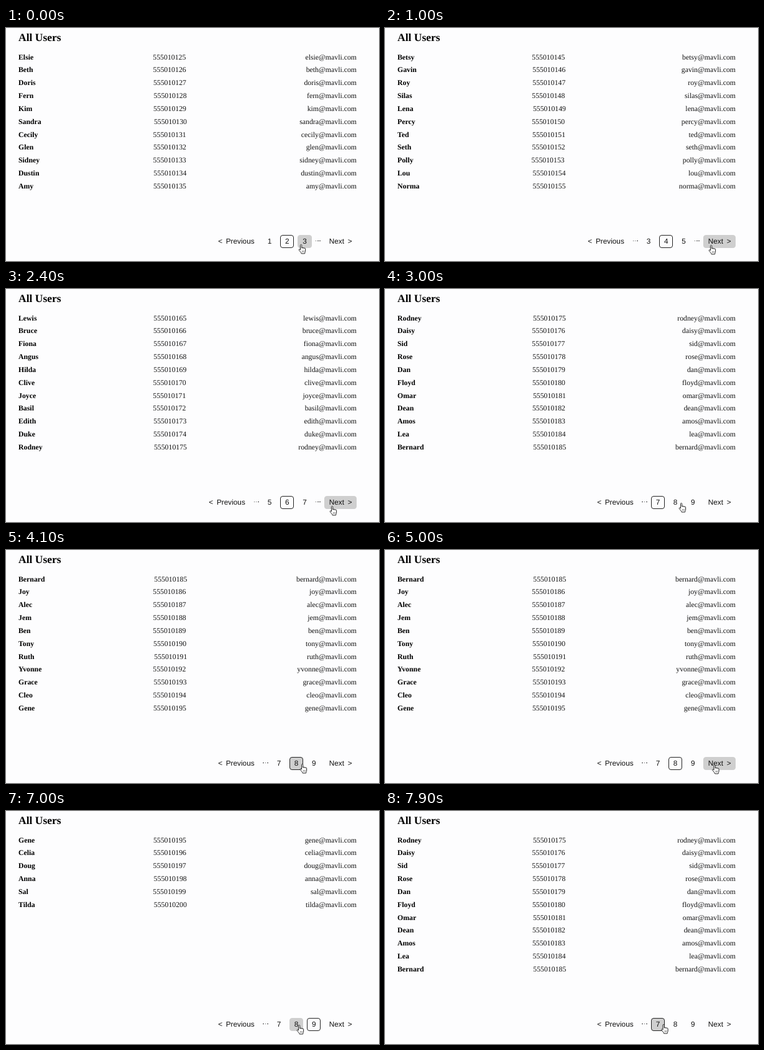
An HTML page that plays this animation: 600x376 px, repeating every 8 s.

```html
<!DOCTYPE html>
<html lang="en">
<head>
<meta charset="utf-8">
<title>All Users</title>
<style>
  html, body { margin: 0; width: 100%; height: 100%; overflow: hidden; background: #fdfdfe; }
  #stage {
    position: relative; width: 600px; height: 376px; overflow: hidden;
    background: #fdfdfe; color: #111; font-size: 11.8px;
    text-rendering: geometricPrecision; cursor: default;
  }
  h2, #list { position: absolute; left: 20px; margin: 0; font-family: "Liberation Serif", "Times New Roman", serif; }
  h2 { top: 5px; font-size: 17.5px; line-height: 21px; color: #000; }
  #list { top: 36.6px; width: 544px; }
  .row { display: flex; justify-content: space-between; height: 20.83px; line-height: 20.83px; white-space: pre; }
  .row b { color: #000; }
  #pager {
    position: absolute; right: 36px; top: 333.5px; height: 21.6px;
    display: flex; justify-content: flex-end; gap: 6px;
    font-family: "Liberation Sans", Arial, sans-serif; line-height: 19.6px;
  }
  .btn {
    box-sizing: border-box; display: flex; justify-content: center; gap: 5.7px;
    padding: 0 6.4px; border: 1px solid transparent; border-radius: 4px; white-space: pre;
  }
  .num { width: 22.2px; padding: 0; }
  .on { border-color: #222; }
  .hot { background: #cfcfcf; }
  .hot:not(.on) { border-color: #cfcfcf; }
  .gap { width: 8.8px; display: flex; justify-content: space-between; align-items: center; }
  .gap i { width: 1.6px; height: 1.6px; border-radius: 50%; background: #222; margin: -2px .3px 0; }
  #hand { position: absolute; left: 0; top: 0; width: 12px; height: 16px; overflow: visible; }
</style>
</head>
<body>
<div id="stage">
  <h2>All Users</h2>
  <div id="list"></div>
  <div id="pager"></div>
  <svg id="hand" viewBox="0 0 12 16">
    <path d="M3 9.2V1.6a1.1 1.1 0 0 1 2.2 0V6.2a1 1 0 0 1 2 .2a1 1 0 0 1 2 .4a1 1 0 0 1 1.9.5V11c0 1.2-.9 2-1 4H4.6C4.4 13 1.9 11.2.9 9.6c-.8-1.2.6-2.2 1.4-1.3z"
      fill="#fff" stroke="#222" stroke-width="1" stroke-linejoin="round"/>
    <path d="M5.9 10.2v2.6M7.4 10.2v2.6M8.9 10.2v2.6" stroke="#444" stroke-width=".6"/>
  </svg>
</div>
<script>
const LOOP = 8000, STEP = 100, LAST = 9, FIRST_PHONE = 555010125;

const names = `Elsie Beth Doris Fern Kim Sandra Cecily Glen Sidney Dustin
  Amy Trudy Wilma Hugo Brenda Noel Agnes Curt Phoebe Dale
  Betsy Gavin Roy Silas Lena Percy Ted Seth Polly Lou
  Norma Enid Roger Max Kevin Lisa Ethel Neil Cedric Diane
  Lewis Bruce Fiona Angus Hilda Clive Joyce Basil Edith Duke
  Rodney Daisy Sid Rose Dan Floyd Omar Dean Amos Lea
  Bernard Joy Alec Jem Ben Tony Ruth Yvonne Grace Cleo
  Gene Celia Doug Anna Sal Tilda`.split(/\s+/);

// [time, page]
const clicks = [[0, 2], [200, 3], [800, 4], [1500, 5], [2100, 6], [2700, 7],
  [4000, 8], [5200, 9], [7200, 8], [7600, 7]];

// [time, x, y] of the fingertip
const track = [[0, 474.5, 350], [300, 474.5, 350], [600, 524.5, 351], [2800, 524.5, 351],
  [2900, 509, 349], [3000, 476.5, 346], [4400, 476.5, 346], [4800, 530, 347],
  [6500, 530, 347], [6800, 471.5, 346], [7300, 471.5, 346], [7500, 448, 345], [8000, 448, 345]];

const $ = id => document.getElementById(id);
const list = $("list"), pager = $("pager"), hand = $("hand");

function tipAt(t) {
  const i = Math.max(1, track.findIndex(k => k[0] >= t));
  const [t0, x0, y0] = track[i - 1], [t1, x1, y1] = track[i];
  const p = (t - t0) / (t1 - t0);
  return [x0 + (x1 - x0) * p, y0 + (y1 - y0) * p];
}

const pageAt = t => clicks.filter(c => c[0] <= t).pop()[1];

function rows(page) {
  const start = (page - 2) * 10;
  return names.slice(start, start + 11).map((name, i) =>
    `<div class="row"><b>${name}</b><span>${FIRST_PHONE + start + i}</span>` +
    `<span>${name.toLowerCase()}@mavli.com</span></div>`).join("");
}

function buttons(page) {
  // the last three pages share one fixed group
  const from = page > LAST - 3 ? LAST - 2 : page - 1;
  const gap = `<span class="gap"><i></i><i></i><i></i></span>`;
  let html = `<span class="btn"><span>&lt;</span><span>Previous</span></span>`;
  if (from > 1) html += gap;
  for (let n = from; n < from + 3; n++)
    html += `<span class="btn num${n === page ? " on" : ""}">${n}</span>`;
  if (from + 2 < LAST) html += gap;
  return html + `<span class="btn"><span>Next</span><span>&gt;</span></span>`;
}

let shownPage, shownTime;

function render(t) {
  if (t === shownTime) return;
  shownTime = t;
  const page = pageAt(t);
  if (page !== shownPage) {
    list.innerHTML = rows(page);
    pager.innerHTML = buttons(page);
    shownPage = page;
  }
  const [x, y] = tipAt(t);
  hand.style.transform = `translate(${x - 4}px, ${y - 1}px)`;
  // the highlight trails the pointer by one step
  const [hx] = tipAt(Math.max(0, t - STEP));
  for (const b of pager.querySelectorAll(".btn")) {
    const r = b.getBoundingClientRect();
    b.classList.toggle("hot", hx >= r.left && hx <= r.right);
  }
}

const begin = performance.now();
function tick() {
  const t = (performance.now() - begin) % LOOP;
  render(Math.floor(t / STEP) * STEP);
  requestAnimationFrame(tick);
}
tick();
</script>
</body>
</html>
```
